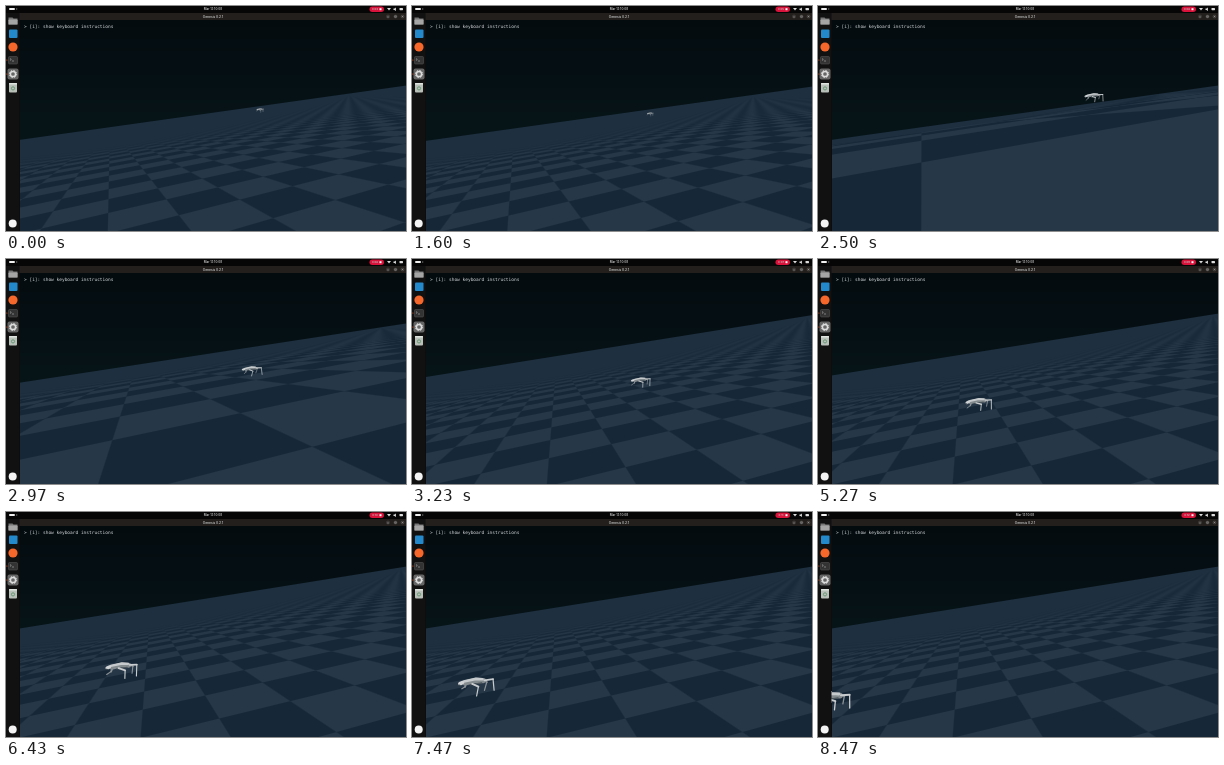
An HTML page with a canvas that plays this animation: 400 by 225 pixels, repeating every 8500 ms.

```html
<!DOCTYPE html>
<html>
<head>
<meta charset="utf-8">
<style>
html, body { margin: 0; width: 100%; height: 100%; overflow: hidden; background: #0b0b0b; }
canvas, svg { position: absolute; left: 0; top: 0; width: 100vw; height: 100vh; display: block; }
text { font-family: "DejaVu Sans Mono", monospace; fill: #d4d9db; }
.ui { font-family: Inter, "Open Sans", sans-serif; font-weight: 600; text-anchor: middle; fill: #c4c4c4; }
</style>
</head>
<body>
<canvas id="view" width="400" height="225"></canvas>
<svg viewBox="0 0 400 225" preserveAspectRatio="none">
  <!-- top bar and title bar -->
  <rect width="400" height="7" fill="#060606"/>
  <rect x="13" y="7" width="387" height="7" fill="#221f1c"/>
  <rect x="3" y="2" width="6" height="2" rx="1" fill="#f0f0f0"/>
  <circle cx="10.7" cy="3" r=".7" fill="#777"/>
  <text class="ui" x="207" y="4" font-size="3">Mar 13 10:08</text>
  <text class="ui" x="207" y="11.6" font-size="3.2">Genesis 0.2.1</text>
  <rect x="363.5" y=".5" width="14.5" height="5.5" rx="2.7" fill="#d8123a"/>
  <text class="ui" id="clock" x="369" y="4.1" font-size="2.7"></text>
  <rect x="373.5" y="2.2" width="2" height="2" fill="#fff"/>
  <g fill="#ddd">
    <path d="M381 2l2 2.6 2-2.6z"/>
    <path d="M387.5 2.5h1l1.4-1v3.4l-1.4-1h-1z"/>
    <rect x="393.5" y="2" width="3.5" height="2.2" rx=".6"/>
  </g>
  <g fill="#3c3937"><circle cx="382" cy="10.5" r="2"/><circle cx="389.5" cy="10.5" r="2"/><circle cx="396.5" cy="10.5" r="2"/></g>
  <path d="M381 11h2M388.7 9.8h1.6v1.5h-1.6zM395.8 9.8l1.4 1.4m0-1.4l-1.4 1.4" stroke="#bbb" stroke-width=".4" fill="none"/>
  <!-- dock -->
  <rect y="7" width="13.5" height="218" fill="#111"/>
  <path d="M2.5 11.5h4l1 1h4v6h-9z" fill="#777"/><rect x="2.5" y="13.6" width="9" height="5" rx=".6" fill="#a5a5a5"/>
  <rect x="3" y="23.5" width="8.5" height="8.5" rx="1" fill="#2489ca"/>
  <circle cx="7" cy="41" r="4.6" fill="#f5672a"/>
  <rect x="2.5" y="50.5" width="9" height="7.5" rx="1" fill="#333" stroke="#5a5a5a" stroke-width=".5"/>
  <path d="M4 52.5l1.3 1-1.3 1M6 55h2" stroke="#ccc" stroke-width=".5" fill="none"/>
  <rect x="1.5" y="62.5" width="11" height="11" rx="2" fill="#666"/>
  <circle cx="7" cy="68" r="2.6" fill="none" stroke="#ddd" stroke-width="1.5"/>
  <circle cx="7" cy="68" r="3.6" fill="none" stroke="#ddd" stroke-width="1" stroke-dasharray="1.4 1.43"/>
  <rect x="3" y="77" width="8" height="9.5" rx="1" fill="#b9c0b9"/><rect x="3" y="77" width="8" height="1.6" rx=".6" fill="#e0e4e0"/>
  <circle cx="7" cy="82.4" r="1.6" fill="none" stroke="#4d8a5a" stroke-width=".7"/>
  <g fill="#e95420"><circle cx=".9" cy="54" r=".6"/><circle cx=".9" cy="68" r=".6"/></g>
  <circle cx="6.7" cy="217.5" r="4" fill="#f4f4f4"/>
  <text x="18" y="22.4" font-size="4.5" xml:space="preserve">&gt; [i]: show keyboard instructions</text>
</svg>
<script>
const LOOP = 8500, W = 386, TOP = 14, H = 211, LEFT = 14, FOCAL = 290;
const ctx = document.getElementById('view').getContext('2d');
const clock = document.getElementById('clock');
const floorImg = ctx.createImageData(W, H);
const RAD = Math.PI / 180;
const clamp = (v, a, b) => Math.min(b, Math.max(a, v));

// time, log height, yaw, pitch, roll, u, v (one tile is one unit)
const CAMERA = [
  [880, .358, -19.4, 2.5, 8, 4.24, -1.22],
  [1600, .34, -19.7, 2.3, 8, 4.3, -1.1],
  [2500, -2.66, -19.5, 2.5, 8, 4.01, -.62],
  [3230, .432, -11.2, 6.3, 9.1, 4.4, -1.53],
  [3480, .432, -11.2, 6.6, 9.1, 4.4, -1.53]
];
// time, x, y, scale
const ROBOT = [
  [0, 254, 104, .38], [1600, 238, 108, .34], [2500, 276, 91, .98],
  [3230, 229, 122.5, 1.05], [5270, 161, 144.5, 1.4], [6430, 116, 157, 1.72],
  [8470, 14, 188, 2]
];

function sample(keys, t) {
  let i = 0;
  while (i < keys.length - 2 && t > keys[i + 1][0]) i++;
  const a = keys[i], b = keys[i + 1];
  const k = clamp((t - a[0]) / (b[0] - a[0]), 0, 1);
  return a.slice(1).map((v, j) => v + (b[j + 1] - v) * k);
}

// square wave, softened by the pixel footprint
function stripe(u, foot) {
  const level = Math.min(1, 2 * Math.abs(u - Math.round(u)) / foot);
  return Math.floor(u) & 1 ? -level : level;
}

// diagonal component of the checks, fading once a pixel covers a whole stripe
const diagonal = (p, foot) => foot > 1.2 ? 0 : .7 * Math.cos(Math.PI * p) * (1 - foot / 1.2);

function paintFloor([logH, yaw, pitch, roll, u0, v0]) {
  const height = Math.exp(logH), data = floorImg.data;
  const cy = Math.cos(yaw * RAD), sy = Math.sin(yaw * RAD);
  const cp = Math.cos(pitch * RAD), sp = Math.sin(pitch * RAD);
  const cr = Math.cos(roll * RAD), sr = Math.sin(roll * RAD);
  let p = 0;
  for (let j = 0; j < H; j++) for (let i = 0; i < W; i++) {
    const dx = i + .5 - W / 2, dy = j + .5 - H / 2;
    const x = dx * cr - dy * sr, y = dx * sr + dy * cr;
    const down = y * cp + FOCAL * sp;
    const s = Math.min(1, j / 110);
    let r = 4 + 2 * s, g = 11 + 9 * s, b = 15 + 9 * s;
    if (down > -.5) {
      const d = Math.max(down, .3), gx = height * x / d;
      const gz = height * (FOCAL * cp - y * sp) / d;
      const u = gx * cy - gz * sy, v = gx * sy + gz * cy;
      const foot = (slope, pos) => (height * Math.abs(slope) + Math.abs(pos)) / d;
      const fu = foot(cy, u), fv = foot(sy, v);
      const near = clamp(2 - 2 * Math.max(fu, fv), 0, 1);
      let c = 0;
      if (near > 0) c += near * stripe(u + u0, fu) * stripe(v + v0, fv);
      if (near < 1) c += (1 - near) * (
        diagonal(u + u0 - v - v0, foot(cy - sy, u - v)) -
        diagonal(u + u0 + v + v0, foot(cy + sy, u + v)));
      const k = Math.min(1, down + .5);
      r += (29.5 - 8 * c - r) * k;
      g += (47 - 8 * c - g) * k;
      b += (63 - 8 * c - b) * k;
    }
    data[p++] = r; data[p++] = g; data[p++] = b; data[p++] = 255;
  }
}

function line(color, width, ...pts) {
  ctx.strokeStyle = color;
  ctx.lineWidth = width;
  ctx.beginPath();
  pts.forEach(([x, y]) => ctx.lineTo(x, y));
  ctx.stroke();
}

function leg(x, y, kx, ky, fx, fy, phase, color) {
  const swing = Math.cos(phase), lift = Math.max(0, Math.sin(phase));
  const knee = [kx + swing * .4, ky - lift * .5];
  line(color, 1, [x, y], knee);
  line(color, .65, knee, [fx + swing, fy - lift * 1.2]);
}

function paintRobot(t) {
  const [x, y, size] = sample(ROBOT, t), phase = t / 400 * 2 * Math.PI;
  ctx.save();
  ctx.translate(x, y);
  ctx.scale(size, size);
  ctx.lineCap = ctx.lineJoin = 'round';
  leg(-5, -1.5, -6, 1.5, -8, 3.2, phase + Math.PI, '#8b9296');
  leg(4, -2.5, 6, -1.5, 5, 3, phase, '#8b9296');
  line('#848b8f', 2.8, [-6, -1], [0, -2.4], [4, -2.2]);
  line('#c6cacc', 1.4, [-6.5, -1.8], [0, -3.2], [3.5, -3]);
  line('#4c555b', .7, [-3, 0], [3, -1]);
  line('#cfd3d5', 2, [-8.6, -.6], [-7.3, -1.2]);
  line('#39434a', .7, [-9.1, .2], [-8.4, .4]);
  leg(-2, -.5, 1.5, 1, .8, 6, phase, '#c9cdcf');
  leg(4.5, -2.4, 9, -2.6, 9.3, 4, phase + Math.PI, '#c9cdcf');
  ctx.restore();
}

let lastView = '';
function frame(now) {
  const t = now % LOOP, cam = sample(CAMERA, t), view = cam.join();
  if (view !== lastView) {
    paintFloor(cam);
    lastView = view;
  }
  ctx.putImageData(floorImg, LEFT, TOP);
  paintRobot(t);
  clock.textContent = '0:' + String(4 + Math.floor(t / 1000)).padStart(2, '0');
  requestAnimationFrame(frame);
}
requestAnimationFrame(frame);
</script>
</body>
</html>
```
